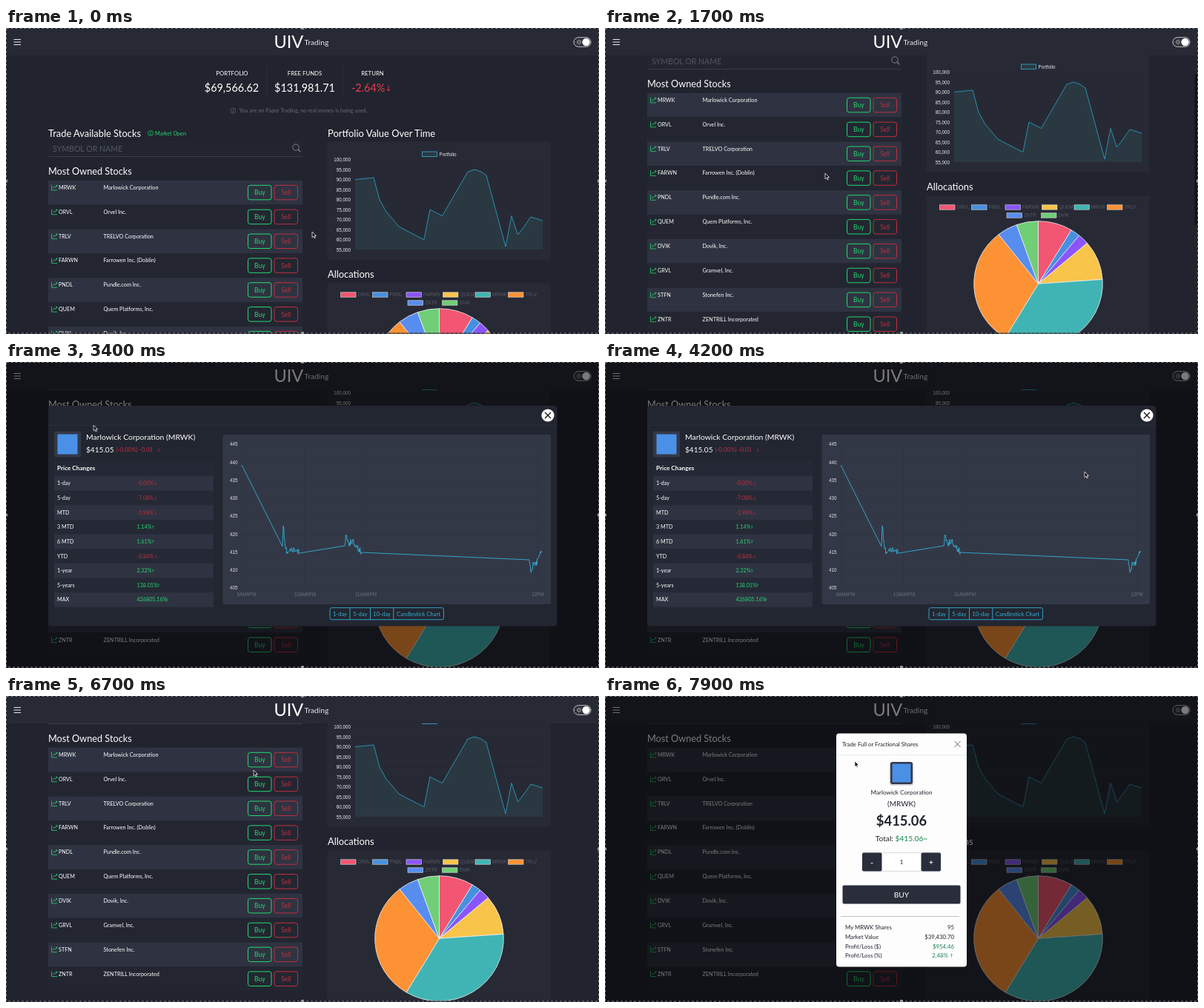
Write an HTML page that moves like this. It is 800x413 px and loops after 8000 ms.

```html
<!DOCTYPE html>
<html lang="en">
<head>
<title>Stock dashboard</title>
<style>
  html, body { margin: 0; width: 100%; height: 100%; overflow: hidden; background: #21242e; }
  svg { display: block; position: absolute; left: 0; top: 0; }
  text { font-family: Lato, "Open Sans", sans-serif; white-space: pre; }
  .plain { font-family: "Liberation Sans", Arial, sans-serif; }
  .scroll, .thumb, .bar, .shade, .modal, .cursor { animation: 8s linear infinite; }
  .scroll { animation-name: scroll; }
  .thumb { animation-name: thumb; }
  .bar { animation-name: bar; }
  .shade { animation-name: shade; }
  #details { animation-name: details; }
  #order { animation-name: order; }
  .cursor { animation-name: cursor; animation-timing-function: ease-in-out; }

  @keyframes scroll {
    0%, 11.25% { transform: translateY(0); animation-timing-function: ease-in-out; }
    21.25% { transform: translateY(-118px); animation-timing-function: ease-out; }
    25%, 100% { transform: translateY(-136px); }
  }
  @keyframes thumb {
    0%, 11.25% { transform: translateY(0); animation-timing-function: ease-in-out; }
    21.25% { transform: translateY(59px); animation-timing-function: ease-out; }
    25%, 100% { transform: translateY(68px); }
  }
  @keyframes bar {
    0%, 11.2% { opacity: 0; }
    11.3%, 32.5% { opacity: 1; }
    35%, 100% { opacity: 0; }
  }
  @keyframes shade {
    0%, 37% { opacity: 0; }
    39.5%, 66.3% { opacity: .52; }
    68.5%, 88% { opacity: 0; }
    90.5%, 99.99% { opacity: .52; }
    100% { opacity: 0; }
  }
  @keyframes details {
    0%, 37.5% { opacity: 0; }
    41%, 66.3% { opacity: 1; }
    68.5%, 100% { opacity: 0; }
  }
  @keyframes order {
    0%, 88.5% { opacity: 0; }
    92%, 99.99% { opacity: 1; }
    100% { opacity: 0; }
  }
  @keyframes cursor {
    0% { transform: translate(413px, 275px); }
    10%, 22% { transform: translate(297px, 196px); }
    31.25% { transform: translate(167px, 122px); }
    35.5%, 40% { transform: translate(66px, 79px); }
    52%, 56% { transform: translate(647px, 148px); }
    64%, 70% { transform: translate(729px, 70px); }
    82%, 83.75% { transform: translate(334px, 100px); }
    87%, 100% { transform: translate(337px, 88px); }
  }
</style>
</head>
<body>
<svg id="stage" width="800" height="413" viewBox="0 0 800 413"></svg>
<script>
const GREEN = '#25d873', RED = '#c02f40', CYAN = '#35aed3', WHITE = '#fff';

// Text with its capitals centred on y
function text(x, y, str, size, fill = WHITE, opt = {}) {
  const { anchor = 'start', weight = 400, plain = false } = opt;
  return `<text x="${x}" y="${(y + size * 0.36).toFixed(2)}" font-size="${size}" fill="${fill}"` +
    ` text-anchor="${anchor}" font-weight="${weight}"${plain ? ' class="plain"' : ''}>${str}</text>`;
}
const mid = { anchor: 'middle' }, end = { anchor: 'end' };
const label = { plain: true }, labelEnd = { plain: true, anchor: 'end' }, labelMid = { plain: true, anchor: 'middle' };

function rect(x, y, w, h, fill, more = '') {
  return `<rect x="${x}" y="${y}" width="${w}" height="${h}" fill="${fill}" ${more}/>`;
}
function path(d, stroke, width = 1, fill = 'none', more = '') {
  return `<path d="${d}" stroke="${stroke}" stroke-width="${width}" fill="${fill}" ${more}/>`;
}
function circle(x, y, r, fill, more = '') {
  return `<circle cx="${x}" cy="${y}" r="${r}" fill="${fill}" ${more}/>`;
}
function button(x, y, str, color) {
  return rect(x, y, 31.5, 19.5, 'none', `rx="3" stroke="${color}"`) + text(x + 15.75, y + 10, str, 8.5, color, mid);
}
function info(x, y, color) {
  return circle(x, y, 3.4, 'none', `stroke="${color}" stroke-width=".7"`) +
    path(`M${x} ${y - 2}v.9M${x} ${y - .4}v2.4`, color, .9);
}
function arrow(x, y, size, color, up) {
  const h = size / 2, w = size * .32, s = up ? -1 : 1;
  return path(`M${x} ${y - h * s}V${y + h * s}m${-w} ${-w * s}l${w} ${w * s}l${w} ${-w * s}`, color, size * .13);
}

const stocks = [
  ['MRWK', 'Marlowick Corporation'], ['ORVL', 'Orvel Inc.'], ['TRLV', 'TRELVO Corporation'],
  ['FARWN', 'Farrowen Inc. (Doblin)'], ['PNDL', 'Pundle.com Inc.'], ['QUEM', 'Quem Platforms, Inc.'],
  ['DVIK', 'Dovik, Inc.'], ['GRVL', 'Gramvel, Inc.'], ['STFN', 'Stonefen Inc.'],
  ['ZNTR', 'ZENTRILL Incorporated']
];

function summary() {
  const divider = x => rect(x, 52, 1, 40, '#2b2e39');
  return text(305, 61.5, 'PORTFOLIO', 7.8, WHITE, mid) + text(304.5, 81, '$69,566.62', 14.4, WHITE, mid) +
    text(403, 61.5, 'FREE FUNDS', 7.8, WHITE, mid) + text(403, 81, '$131,981.71', 14.4, WHITE, mid) +
    text(494.5, 61.5, 'RETURN', 7.8, WHITE, mid) + text(466, 81, '-2.64%', 14.4, '#ee3a50') +
    arrow(516, 81.5, 7, '#ee3a50') + divider(352) + divider(454) +
    info(306.5, 111.5, '#676a73') +
    text(314.5, 111.5, 'You are on Paper Trading, no real money is being used.', 7.3, '#676a73');
}

function search() {
  return text(57, 142, 'Trade Available Stocks', 12.9) + info(195, 142, GREEN) +
    text(201, 142, 'Market Open', 7.2, GREEN) +
    rect(57, 153, 343, 20.5, '#22252f') + rect(57, 173, 343, 1, '#3a3d47') +
    text(63, 163, 'SYMBOL OR NAME', 10.6, '#54575f') +
    circle(391, 161, 4.2, 'none', 'stroke="#858890" stroke-width=".9"') + path('M394 164l3.2 3.4', '#858890', 1.1);
}

function stockList() {
  const rows = stocks.map(([code, name], i) => {
    const y = 205.7 + i * 32.85;
    return rect(57, y, 343, 32.85, i % 2 ? '#232631' : '#2f3341') +
      path(`M61.5 ${y + 6}v7.2h7.5M63 ${y + 11}l2-2.6 1.5 1.2 2.3-3m-1.8 0h1.8v1.8`, GREEN, .8) +
      text(71, y + 9.6, code, 7.2) + text(131.5, y + 9.6, name, 7.3) +
      button(326.5, y + 6.6, 'Buy', GREEN) + button(362, y + 6.6, 'Sell', RED);
  });
  return text(57, 193.5, 'Most Owned Stocks', 12.7) + rows.join('');
}

function valueChart() {
  let out = text(434, 142, 'Portfolio Value Over Time', 12.9) + rect(433.5, 153.5, 301, 159, '#272a35', 'rx="2"') +
    rect(561.5, 167, 20, 6.5, '#2a3843', `stroke="${CYAN}" stroke-width=".8"`) +
    text(584.5, 170.3, 'Portfolio', 6.3, '#e4e5e8', label);
  for (let i = 0; i < 10; i++) {
    const y = 178 + i * 13.47;
    out += text(465, y, (100 - i * 5) + ',000', 6.3, '#e9eaed', labelEnd) + rect(467, y, 257, .6, '#242731');
  }
  const line = '471,204.5 496,202 504,232 513,248 530,268 555.5,281.5 564,285.5 572,245 580.5,249.5 588.5,253.5 ' +
    '623,194 632,191 640,193.5 648,199 674,295 682,253.5 690.5,279 699,268 708,255 724,260';
  return out + path(`M${line}V299H471Z`, 'none', 0, '#2a3842') + path(`M${line}`, '#2b9bbb', .9);
}

// Ticker, colour, end angle, legend x
const shares = [
  ['ORVL', '#f25672', 31, 451.5], ['PNDL', '#4790e0', 39.5, 494.5], ['FARWN', '#8a55fb', 49.5, 540],
  ['QUEM', '#f8c44a', 86, 589.5], ['MRWK', '#40b4b4', 210.8, 633], ['TRLV', '#fd9235', 322, 677.5],
  ['ZNTR', '#588df0', 340.4, 542], ['DVIK', '#70ce77', 360, 588.5]
];

function allocations() {
  const cx = 584.5, cy = 463.3, rx = 86.8, ry = 84.6;
  const point = a => {
    const t = a * Math.PI / 180;
    return `${(cx + rx * Math.sin(t)).toFixed(2)} ${(cy - ry * Math.cos(t)).toFixed(2)}`;
  };
  let from = 0, out = text(434, 332, 'Allocations', 12.9) + rect(433.5, 344.5, 301, 220, '#272a35', 'rx="2"');
  shares.forEach(([code, color, to, x], i) => {
    const y = i < 6 ? 360 : 371;
    out += path(`M${cx} ${cy}L${point(from)}A${rx} ${ry} 0 ${to - from > 180 ? 1 : 0} 1 ${point(to)}Z`, '#f3f3f3', .8, color) +
      rect(x, y - 3.2, 20.5, 6.4, color, 'stroke="#ddd" stroke-width=".6"') + text(x + 23, y, code, 6.3, '#575a64', label);
    from = to;
  });
  return out;
}

function header() {
  let rays = '';
  for (let i = 0; i < 8; i++) rays += `<path d="M773 15.6v-1.1" stroke="#ddd" stroke-width=".7" transform="rotate(${i * 45} 773 19)"/>`;
  return rect(0, 0, 800, 37, '#272a35') +
    path('M10.5 15.5h9.5M10.5 19h9.5M10.5 22.5h9.5', '#e8e8ea', 1) +
    text(361.5, 18.8, 'UIV', 23.5) + text(402.5, 19, 'Trading', 10.2, '#e2e3e6') +
    rect(766, 12.7, 23, 12.6, 'none', 'rx="6.3" stroke="#d9dade" stroke-width=".9"') +
    circle(773, 19, 2, 'none', 'stroke="#ddd" stroke-width=".8"') + rays + circle(782.6, 19, 5.2, WHITE);
}

let seed = 11;
function random() {
  seed = (seed * 16807) % 2147483647;
  return seed / 2147483647;
}
// Jagged trace through a few anchor points
function jagged(points, jitter) {
  let out = '';
  points.forEach(([x, y], i) => {
    out += `L${x} ${y}`;
    const next = points[i + 1];
    if (!next) return;
    const n = Math.max(1, Math.round((next[0] - x) * 1.6));
    for (let k = 1; k < n; k++) {
      const t = k / n;
      out += `L${(x + (next[0] - x) * t).toFixed(1)} ${(y + (next[1] - y) * t + (random() - .5) * jitter).toFixed(1)}`;
    }
  });
  return out;
}

function details() {
  const [code, name] = stocks[0];
  const changes = [['1-day', '-0.00%'], ['5-day', '-7.08%'], ['MTD', '-1.96%'], ['3 MTD', '1.14%'], ['6 MTD', '1.61%'],
    ['YTD', '-0.84%'], ['1-year', '2.32%'], ['5-years', '138.01%'], ['MAX', '426805.16%']];
  let out = rect(57, 59, 686.5, 297.5, '#222631', 'rx="4"') + rect(57, 85, 686.5, .8, '#2c303b') +
    circle(731, 72, 8.6, WHITE) + path('M727 68l8 8m0-8l-8 8', '#111', 1.3) +
    rect(65, 93.5, 36, 35, '#343949', 'rx="3"') + rect(69.5, 97.5, 27, 27, '#4a90e6') +
    text(108, 101.5, `${name} (${code})`, 10.4) + text(108, 118, '$415.05', 10.1) +
    text(148.5, 118, '(-0.00%) -0.01', 7.9, RED) + arrow(206, 118.5, 4.5, RED) +
    rect(65, 134, 215, 196.5, '#252935') + text(69, 143.5, 'Price Changes', 8.2, WHITE, { weight: 700 });
  changes.forEach(([term, value], i) => {
    const y = 163.8 + i * 19.63, up = value[0] !== '-', color = up ? GREEN : RED;
    if (i % 2 === 0) out += rect(65, y - 9.8, 215, 19.63, '#2f3341');
    out += text(69, y, term, 7.2) + text(176.5, y, value, 7.2, color) +
      arrow(177 + value.length * 3.75 + 2.5, y + .3, 4, color, up);
  });
  out += rect(292.5, 98, 442.5, 229, '#333847', 'rx="2"');
  for (let i = 0; i < 9; i++) {
    const y = 111 + i * 24.25;
    out += text(312.5, y, 445 - i * 5, 6.3, '#e2e3e7', labelEnd) + rect(315, y, 409, .7, '#2e3341');
  }
  [[318, '9AM6PM', 324.5], [402, '10AM6PM', 403.5], [485, '11AM6PM', 485.5], [717, '12PM', 717.5]].forEach(([x, str, at]) => {
    out += rect(x, 111, .7, 197, '#2e3341') + text(at, 313.5, str, 6.3, '#6b6f7a', labelMid);
  });
  const trace = 'M318 139' + jagged([[373, 249]], 0) +
    jagged([[374, 221], [375.5, 238], [377, 252], [380, 258], [384, 254], [390, 254], [396, 258]], 9) +
    jagged([[457, 248], [459, 233], [462, 246], [468, 241], [474, 251], [480, 257]], 8) +
    jagged([[706, 267], [708.5, 284], [711, 270], [715, 275], [718, 264], [722.5, 257]], 9);
  out += path(trace, CYAN, .9, 'none', 'stroke-linejoin="round"') +
    rect(437, 331.7, 153.5, 16, 'none', `rx="2.5" stroke="${CYAN}" stroke-width=".9"`) +
    path('M464 331.7v16M491.5 331.7v16M522.8 331.7v16', CYAN, .9);
  [[450.5, '1-day'], [477.8, '5-day'], [507, '10-day'], [556.5, 'Candlestick Chart']].forEach(([x, str]) => {
    out += text(x, 339.8, str, 7.6, CYAN, mid);
  });
  return out;
}

function order() {
  const [code, name] = stocks[0], dark = '#2a2e3a', ink = '#20242c', gain = '#168450';
  const rows = [[`My ${code} Shares`, '95', ink], ['Market Value', '$39,430.70', ink],
    ['Profit/Loss ($)', '$954.46', gain], ['Profit/Loss (%)', '2.48%', gain]];
  let out = rect(312, 50.5, 176, 315, '#fdfdfe', 'rx="4"') + rect(312, 79.5, 176, .8, '#e3e5e8') +
    text(320, 65, 'Trade Full or Fractional Shares', 7.8, ink) + path('M471.5 61l8 8m0-8l-8 8', '#666', 1) +
    rect(383.5, 89, 33, 32, '#d5d7db', 'rx="4"') + rect(385, 89, 30, 30, '#343947', 'rx="3"') +
    rect(387.5, 91.5, 25, 25, '#4a90e6') +
    text(400, 130.3, name, 8.2, ink, mid) + text(400, 145.3, `(${code})`, 10, ink, mid) +
    text(400, 168.5, '$415.06', 18.4, ink, { anchor: 'middle', weight: 700 }) +
    text(400, 192, `Total: <tspan fill="${gain}">$415.06~</tspan>`, 10.2, ink, mid) +
    rect(347, 211.5, 106, 25, WHITE, 'rx="2" stroke="#cfd2d8" stroke-width=".8"') +
    rect(347, 211.5, 26.5, 25, dark, 'rx="2"') + rect(426.5, 211.5, 26.5, 25, dark, 'rx="2"') +
    text(360.2, 224, '-', 10, WHITE, { anchor: 'middle', weight: 700 }) +
    text(439.8, 224, '+', 10, WHITE, { anchor: 'middle', weight: 700 }) + text(400, 224, '1', 7.8, ink, mid) +
    rect(320.5, 255.5, 159, 25, dark, 'rx="2"') + text(400, 268, 'BUY', 10.2, WHITE, mid) +
    rect(318, 297, 160, .8, '#b4b6ba');
  rows.forEach(([term, value, color], i) => {
    const y = 312.3 + i * 12.75;
    out += text(324, y, term, 7.8, ink) + text(i === 3 ? 463 : 471, y, value, 7.8, color, end);
  });
  return out + arrow(467.5, 350.3, 4.5, gain, true);
}

function frame() {
  const dots = [[400, 0], [400, 412], [0, 206.5], [800, 206.5]].map(([x, y]) => circle(x, y, 2.3, '#9a9ca1')).join('');
  return rect(.5, .5, 799, 411.5, 'none', 'stroke="#16181d"') +
    rect(.5, .5, 799, 411.5, 'none', 'stroke="#85878c" stroke-dasharray="3 3"') + dots;
}

document.getElementById('stage').innerHTML =
  rect(0, 0, 800, 413, '#21242e') +
  `<g class="scroll">${summary()}${search()}${stockList()}${valueChart()}${allocations()}</g>` +
  header() +
  `<g class="bar"><g class="thumb">${rect(795.5, 3, 3.5, 204, '#121419', 'rx="1.7"')}</g></g>` +
  rect(0, 0, 800, 413, '#000', 'class="shade"') +
  `<g class="modal" id="details">${details()}</g><g class="modal" id="order">${order()}</g>` +
  frame() +
  `<g class="cursor">${path('M0 0V7.6L1.8 6 3 8.8 4.3 8.2 3.1 5.5H5.5Z', '#f2f2f2', .8, '#0a0a0a')}</g>`;
</script>
</body>
</html>
```
